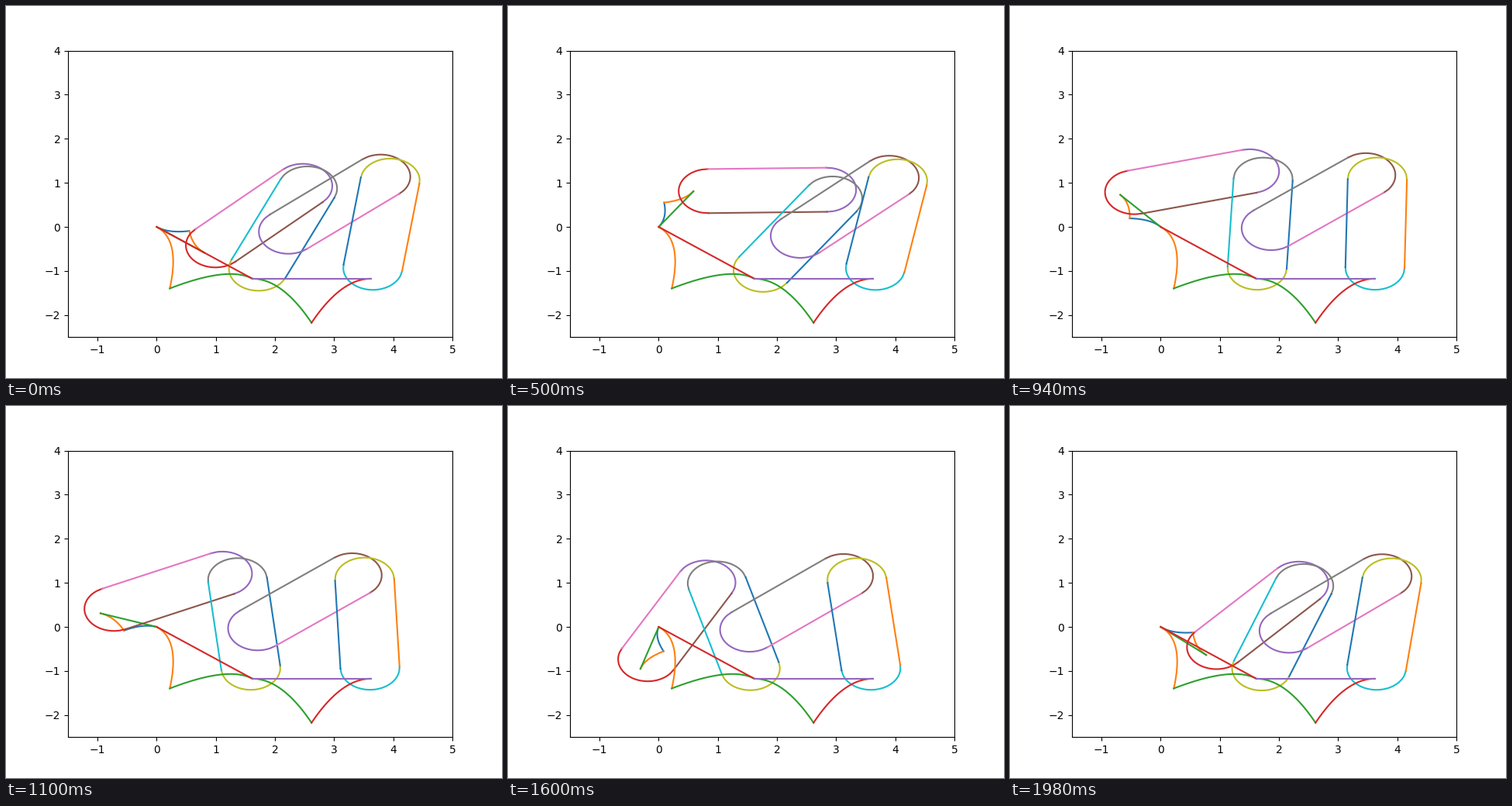
Write a matplotlib script that moves like this. It is 640 by 480 pixels and loops after 2000 ms.

```python
import numpy as np
import matplotlib.pyplot as plt
from matplotlib.animation import FuncAnimation

FRAMES = 100
BAR = 2.5                # joint-to-joint length of every moving bar
INSET, R = 0.25, 0.5     # cap centre offset and cap radius

O = np.array([0.0, 0.0])
A = 2 * np.array([np.cos(np.pi / 5), -np.sin(np.pi / 5)])
B = A + [2, 0]


def place(p, q, x, y):
    """Map local (along, left) coordinates of the link p-q to the plane."""
    u = (q - p) / np.hypot(*(q - p))
    return p[0] + u[0] * x - u[1] * y, p[1] + u[1] * x + u[0] * y


def cusp(p, q, side):
    """Two parabola arcs meeting halfway, closed by a straight line."""
    length = np.hypot(*(q - p))
    x = np.linspace(0, length / 2, 100)
    ends = np.array([0, length])
    return [place(p, q, x, side * x**2),
            place(p, q, length - x[::-1], side * x[::-1]**2),
            place(p, q, ends, 0 * ends)]


def pill(p, q):
    """Round cap at p, round cap at q, right edge, left edge."""
    y = np.linspace(-R, R, 100)
    bulge = np.sqrt(R**2 - y**2)
    x = np.array([INSET, BAR - INSET])
    return [place(p, q, INSET - bulge, y),
            place(p, q, BAR - INSET + bulge, y),
            place(p, q, x, np.full(2, -R)),
            place(p, q, x, np.full(2, R))]


def joint(p, q):
    """Point at distance BAR from both p and q, left of p-q."""
    d = q - p
    dist = np.hypot(*d)
    height = np.sqrt(BAR**2 - dist**2 / 4)
    return (p + q) / 2 + height * np.array([-d[1], d[0]]) / dist


def mechanism(i):
    angle = -np.pi / 5 + 2 * np.pi * i / FRAMES
    crank = np.array([np.cos(angle), np.sin(angle)])
    top = joint(crank, A)
    pivot = A + (top - A) / BAR
    far = joint(pivot, B)
    return (cusp(O, crank, 1) + pill(crank, top) + pill(top, A)
            + cusp(O, A, -1) + pill(pivot, far) + pill(far, B)
            + cusp(A, B, -1))


fig, ax = plt.subplots(figsize=(6.4, 4.8), dpi=100)
ax.set_xlim(-1.5, 5)
ax.set_ylim(-2.5, 4)
lines = [ax.plot(x, y, color=f"C{k % 10}", lw=1.5)[0]
         for k, (x, y) in enumerate(mechanism(0))]


def update(i):
    for line, (x, y) in zip(lines, mechanism(i)):
        line.set_data(x, y)
    return lines


anim = FuncAnimation(fig, update, frames=FRAMES, interval=20,
                     init_func=lambda: update(0), repeat=True)
plt.show()
```
